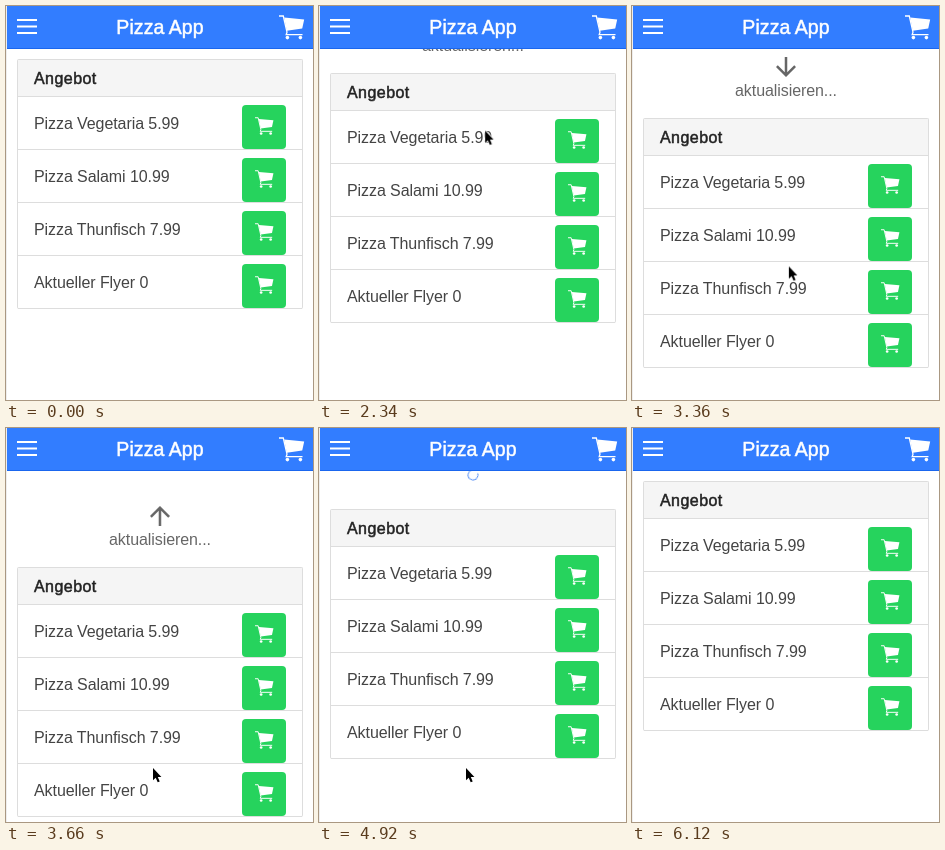
Write an HTML page that moves like this. It is 307x394 px and loops after 6.54 s.

```html
<!DOCTYPE html>
<html lang="de">
<head>
<meta charset="utf-8">
<title>Pizza App</title>
<style>
@property --y { syntax: "<integer>"; inherits: true; initial-value: 0; }

html, body { margin: 0; width: 100%; height: 100%; overflow: hidden; background: #fff; }
body {
  position: relative;
  font: 16px "Liberation Sans", Arial, sans-serif;
  letter-spacing: -.08px;
  color: #444;
}
body * { box-sizing: border-box; }
.edge { position: absolute; left: 0; top: 0; width: 1px; height: 100%; background: #eee; }
svg { position: absolute; display: block; overflow: visible; }

.bar {
  position: absolute; left: 1px; right: 0; top: 0; height: 43px;
  background: #327dff; border-bottom: 1px solid #1a66ee; color: #fff;
}
.bar h1 {
  margin: 0; font-size: 19.5px; font-weight: 400; line-height: 43px; text-align: center;
  letter-spacing: .06px; -webkit-text-stroke: .5px #fff;
}
.menu { left: 10px; top: 13px; }
.bar .cart { left: 272px; top: 9px; width: 26px; height: 25px; }

.scroll { position: absolute; left: 0; top: calc(var(--y) * 1px); width: 307px; }
.pull, .list { position: absolute; }
.pull { left: 0; top: 0; width: 308px; color: #666; }
.pull p { position: absolute; top: 18px; width: 100%; margin: 0; line-height: 16px; text-align: center; }
.arrow { left: 144px; top: -8px; }
.spin { left: 140px; top: 5px; }

.list { left: 11px; top: 53px; width: 286px; border: 1px solid #ddd; border-bottom: 0; border-radius: 2px; }
.list h2 {
  margin: 0; height: 37px; padding-left: 16px; background: #f5f5f5; border-bottom: 1px solid #ddd;
  font-size: 16px; font-weight: 400; line-height: 37px; letter-spacing: .45px; color: #222;
  -webkit-text-stroke: .5px #222;
}
.row { position: relative; height: 53px; padding-left: 16px; line-height: 53px; border-bottom: 1px solid #ddd; }
.buy { position: absolute; left: 224px; top: 8px; width: 44px; height: 44px; border-radius: 4px; background: #26d35d; }
.buy .cart { left: 13px; top: 12px; width: 19px; height: 18.3px; }
.cart { color: #fff; }
.pointer { left: 0; top: 0; }

/* One 6540 ms timeline, advanced by the script in 60 ms ticks */
.scroll, .pull, .arrow, .spin, .spin g, .spin circle, .pointer {
  animation: 6540ms linear infinite paused;
}
.scroll { animation-name: drag; }
.pull { animation-name: hint; }
.arrow { animation-name: flip; }
.spin { animation-name: show; }
.spin g { animation-name: turn; transform-origin: 32px 32px; }
.spin circle { animation-name: dash; }
.pointer { animation-name: point; }

@keyframes drag {
  0%, 29.358% { --y: 0; animation-timing-function: cubic-bezier(.3, .3, .5, 1); }
  37.615% { --y: 15; }
  41.284% { --y: 15; }
  44.037% { --y: 44; animation-timing-function: ease-out; }
  45.872% { --y: 51; }
  49.541% { --y: 51; animation-timing-function: cubic-bezier(.4, .1, .5, 1); }
  55.963% { --y: 86; }
  65.596% { --y: 86; animation-timing-function: cubic-bezier(.333, 1, .667, 1); }
  73.242% { --y: 60; }
  73.517% { --y: 60; animation-timing-function: cubic-bezier(.333, 1, .667, 1); }
  81.162%, 100% { --y: 0; }
}
@keyframes hint {
  0%, 65.595% { visibility: visible; }
  65.596%, 100% { visibility: hidden; }
}
@keyframes flip {
  0%, 51.682% { transform: rotate(0deg); }
  54.74%, 100% { transform: rotate(180deg); }
}
@keyframes show {
  0%, 65.595% { transform: scale(0); }
  65.596%, 73.517% { transform: scale(1); }
  76.575%, 100% { transform: scale(0); }
}
@keyframes turn {
  0%, 65.596% { transform: rotate(-173deg); }
  76.575%, 100% { transform: rotate(3.5deg); }
}
@keyframes dash {
  0%, 67.737% {
    stroke-dasharray: 188px; stroke-dashoffset: 182px;
    animation-timing-function: cubic-bezier(.65, 0, .35, 1);
  }
  77.676%, 100% { stroke-dasharray: 130px; stroke-dashoffset: 0px; }
}
@keyframes point {
  0%, 1.835% { transform: translate(166px, -20px); animation-timing-function: cubic-bezier(.3, .3, .5, 1); }
  11.927%, 28.44% { transform: translate(168px, 74px); }
  29.358% { transform: translate(168px, 79px); animation-timing-function: cubic-bezier(.3, .3, .5, 1); }
  37.615%, 41.284% { transform: translate(165px, 126px); }
  44.037% { transform: translate(160px, 225px); animation-timing-function: ease-out; }
  45.872%, 49.541% { transform: translate(159px, 234px); animation-timing-function: cubic-bezier(.4, .1, .5, 1); }
  55.963%, 84.404% { transform: translate(146px, 339px); animation-timing-function: cubic-bezier(.4, 0, .7, 1); }
  93.578%, 100% { transform: translate(187px, -20px); }
}
</style>
</head>
<body>
<svg width="0" height="0">
  <symbol id="cart" viewBox="0 0 26 25">
    <path d="M0 1H4.3L8 17.2 7.2 19.6H23.5" fill="none" stroke="currentColor" stroke-width="1.3"/>
    <path d="M5.2 2.6 25.2 4.4 23.2 13.6 7.8 15.8Z" fill="currentColor"/>
    <circle cx="8.4" cy="22.6" r="1.8" fill="currentColor"/>
    <circle cx="21.4" cy="22.6" r="1.8" fill="currentColor"/>
  </symbol>
</svg>

<div class="scroll">
  <div class="pull">
    <svg class="arrow" width="20" height="20" viewBox="4 4 16 16">
      <path d="M20 12l-1.41-1.41L13 16.17V4h-2v12.17l-5.58-5.59L4 12l8 8z" fill="#666"/>
    </svg>
    <p>aktualisieren...</p>
  </div>
  <svg class="spin" width="28" height="28" viewBox="0 0 64 64">
    <g><circle cx="32" cy="32" r="26" fill="none" stroke="#4080f4" stroke-width="5"/></g>
  </svg>
  <div class="list">
    <h2>Angebot</h2>
    <div class="row">Pizza Vegetaria 5.99<span class="buy"><svg class="cart"><use href="#cart"/></svg></span></div>
    <div class="row">Pizza Salami 10.99<span class="buy"><svg class="cart"><use href="#cart"/></svg></span></div>
    <div class="row">Pizza Thunfisch 7.99<span class="buy"><svg class="cart"><use href="#cart"/></svg></span></div>
    <div class="row">Aktueller Flyer 0<span class="buy"><svg class="cart"><use href="#cart"/></svg></span></div>
  </div>
</div>

<div class="bar">
  <svg class="menu" width="20" height="15"><path d="M0 1H20M0 7.5H20M0 14H20" stroke="#fff" stroke-width="1.8"/></svg>
  <h1>Pizza App</h1>
  <svg class="cart"><use href="#cart"/></svg>
</div>
<div class="edge"></div>

<svg class="pointer" width="11" height="18">
  <path d="M1 1V13.3L3.7 10.7 5.7 15.2 7.7 14.4 5.8 9.9H9.4Z" fill="#000" stroke="#fff" stroke-width="1.8" paint-order="stroke"/>
</svg>

<script>
const LOOP = 6540, TICK = 60;

function draw() {
  const t = Math.floor(performance.now() / TICK) * TICK % LOOP;
  for (const a of document.getAnimations()) a.currentTime = t;
  requestAnimationFrame(draw);
}
draw();
</script>
</body>
</html>
```
